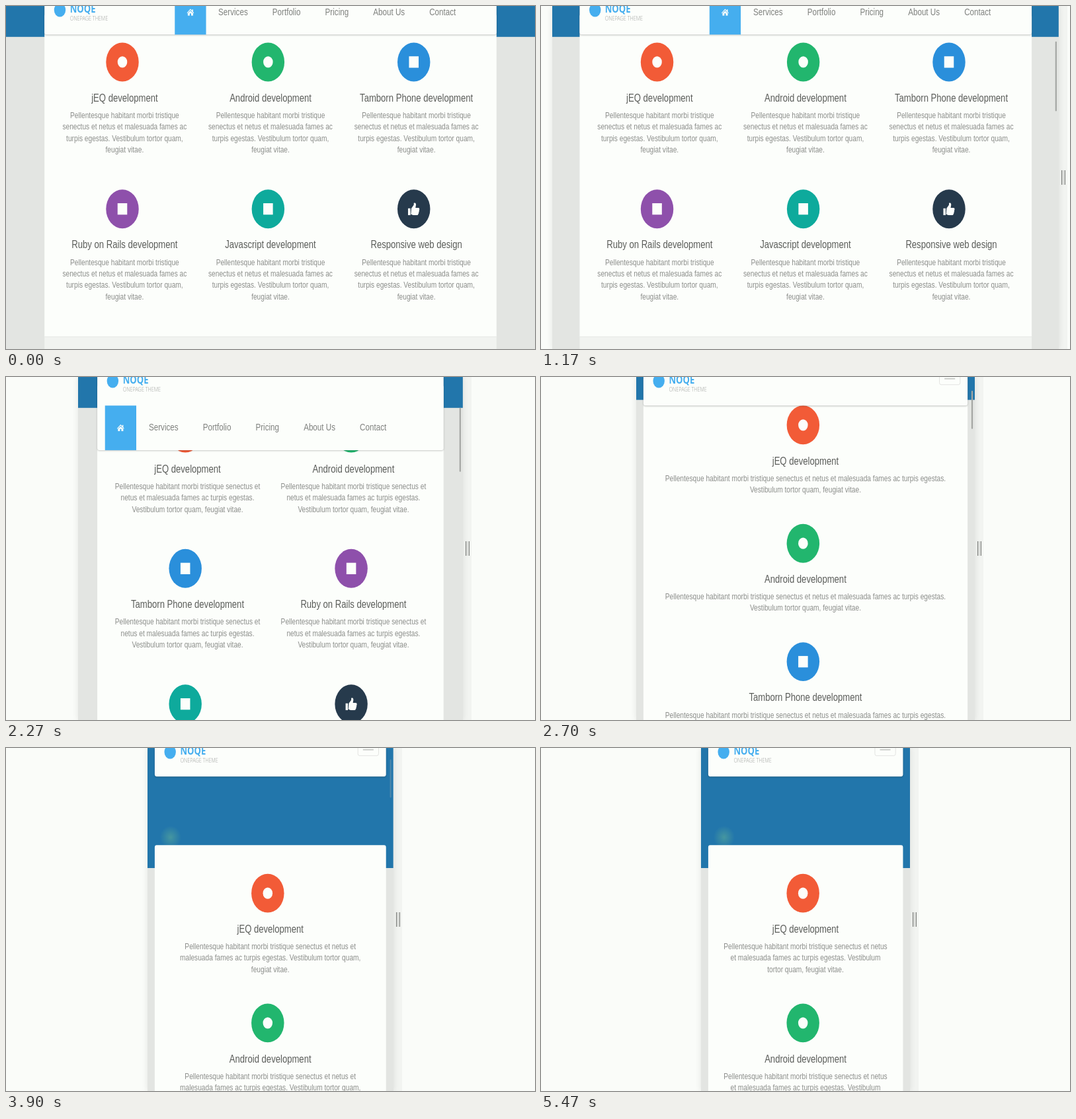
An HTML page that plays this animation: 800x520 px, repeating every 5.53 s.

```html
<!DOCTYPE html>
<html lang="en">
<head>
<meta charset="utf-8">
<title>Responsive page demo</title>
<style>
@property --edge { syntax: "<length>"; inherits: false; initial-value: -16px; }
* { box-sizing: border-box; }
html, body { margin: 0; width: 100%; height: 100%; overflow: hidden; background: #fafcf9; }
.stage { position: relative; width: 800px; height: 520px; overflow: hidden; background: #fafcf9; }

.frame { position: absolute; inset: 0 var(--edge); animation: squeeze 5530ms linear infinite; }
@keyframes squeeze {
  0%, 12.66% { --edge: -16px; }
  21.16% { --edge: 17px; }
  32.55% { --edge: 66.5px; }
  42.86% { --edge: 118px; }
  48.82% { --edge: 144px; }
  52.98% { --edge: 158px; }
  62.03% { --edge: 184.5px; }
  73.6% { --edge: 225px; }
  79.02% { --edge: 235px; }
  83.18%, 100% { --edge: 242px; }
}
.clip { position: absolute; inset: 0; overflow: hidden; background: #e3e5e2; box-shadow: 0 0 9px rgba(0, 0, 0, .1); }
.grip { position: absolute; left: 100%; top: 0; width: 13px; height: 100%; background: #f2f4f1; }
.grip::after { content: ""; position: absolute; left: 4px; top: 249px; width: 4px; height: 22px; border: solid #7b7d7a; border-width: 0 1px; background: #dcdedb; }

/* The page is laid out at 1100 x 600 and shown at 800 x 520. */
.page {
  container-type: inline-size;
  position: absolute; left: 0; top: 0; width: 137.5%; height: 600px;
  transform: scale(calc(8 / 11), calc(13 / 15)); transform-origin: 0 0;
  font: 14px/20px "Liberation Sans", Arial, sans-serif; color: #8b8d8a;
}
.view { --top: 14px; --wide: 940px; --cols: 3; --gap: 59.2px; position: absolute; inset: 0; }
.hero { position: absolute; left: 0; right: 0; top: 0; height: calc(var(--top) + 40px); background: #2276ab; }
.glow { display: none; position: absolute; left: 26px; bottom: 34px; width: 44px; height: 40px; background: radial-gradient(closest-side, #4596a0, #2276ab00); }
.card, .nav { position: absolute; left: 0; right: 0; margin: 0 auto; width: var(--wide); background: #fcfefb; }
.card { top: var(--top); padding: 50px 15px 0; border-radius: 4px 4px 0 0; display: flex; flex-wrap: wrap; }
.card::after { content: ""; position: absolute; left: 0; right: 0; top: 100%; height: 600px; background: #f1f3f0; border-top: 1px solid #e6e8e5; }
.item { width: calc(100% / var(--cols)); padding: 0 15px; margin-bottom: var(--gap); text-align: center; }
.disc { position: relative; left: -5px; display: flex; align-items: center; justify-content: center; width: 68px; height: 68px; margin: 0 auto; border-radius: 50%; }
.dot, .box { width: 20px; height: 20px; background: #fcfefb; }
.dot { border-radius: 50%; }
h4 { margin: 20px 0 9.5px; font-size: 18px; font-weight: 400; line-height: 19.8px; color: #5b5d5a; white-space: nowrap; }
p { margin: 0 0 .5px; }
svg { display: block; fill: #fcfefb; }

.nav { top: 0; height: 50px; border-radius: 0 0 4px 4px; box-shadow: 0 1px 3px rgba(0, 0, 0, .25); }
.mark { position: absolute; left: 20px; top: -5px; width: 24px; height: 24px; border-radius: 50%; background: #45aeef; }
.nav b, .nav small { position: absolute; left: 53px; font-family: "Open Sans", sans-serif; line-height: 1; white-space: nowrap; }
.nav b { top: -4px; font-size: 18px; color: #45aeef; }
.nav small { top: 15.5px; font-size: 10px; font-weight: 300; color: #9a9c99; }
ul { position: absolute; left: 270.5px; top: -28px; display: flex; gap: 1px; margin: 0; padding: 0; list-style: none; white-space: nowrap; }
li { height: 78px; padding: 0 25px; font-size: 16px; line-height: 78px; color: #7f817e; }
.home { width: 65px; padding-top: 33px; background: #45aeef; }
.menu { display: none; position: absolute; right: 15px; top: -20px; width: 44px; height: 34px; padding: 9px 10px; border: 1px solid #dcdedb; border-radius: 4px; }
.menu i { display: block; height: 2px; margin-bottom: 4px; background: #c6c8c5; }
.bar { position: absolute; right: 4px; top: 62px; width: 3px; height: 122px; border-radius: 2px; background: #a4a6a3; }

@container (max-width: 991.9px) {
  .view { --wide: 720px; --cols: 2; }
  .nav { height: 128px; }
  ul { left: 16px; top: 50px; }
  .bar { top: 54px; height: 112px; }
}
@container (max-width: 767.9px) {
  .view { --top: 0px; --wide: calc(100% - 30px); --cols: 1; --gap: 49.2px; }
  .nav { height: 50px; }
  ul { display: none; }
  .menu { display: block; }
  .bar { top: 24px; height: 67px; }
}
@container (max-width: 640px) {
  .view { --top: 74px; }
  .bar { top: 20px; background: rgba(150, 165, 175, .35); }
}
@container (max-width: 520px) {
  .view { --top: 170px; }
  .glow { display: block; }
}
@container (max-width: 445px) {
  .bar { display: none; }
}
</style>
</head>
<body>
<div class="stage">
  <div class="frame">
    <div class="grip"></div>
    <div class="clip">
      <div class="page">
        <div class="view">
          <div class="hero"><div class="glow"></div></div>
          <div class="card"></div>
          <div class="nav">
            <div class="mark"></div><b>NOQE</b><small>ONEPAGE THEME</small>
            <ul>
              <li class="home"><svg width="15" height="12" viewBox="0 0 15 12"><path d="M7.5 0 11 3V1h2v4l2 2-1 1-6.5-6L1 8 0 7zM7.5 3.5 13 8v4H9V8H6v4H2V8z"/></svg></li>
              <li>Services</li><li>Portfolio</li><li>Pricing</li><li>About Us</li><li>Contact</li>
            </ul>
            <div class="menu"><i></i><i></i><i></i></div>
          </div>
          <div class="bar"></div>
        </div>
      </div>
    </div>
  </div>
</div>
<script>
const dot = '<div class="dot"></div>', box = '<div class="box"></div>';
const thumb = `<svg width="24" height="22" viewBox="0 0 24 22"><path d="M0 10h5v12H0zM7 10l5-6V1q0-1 1.5-1 3 0 3 4l-1 5h6q2.5 0 2.5 2.5 0 1.5-1 2 .8 2-.7 3.2 .5 2-1 3 0 2.3-3 2.3h-6q-3 0-6.3-2z"/></svg>`;
const blurb = "Pellentesque habitant morbi tristique senectus et netus et malesuada fames ac turpis egestas. Vestibulum tortor quam, feugiat vitae.";
const items = [
  ["jEQ development", "#f25b37", dot],
  ["Android development", "#22b66e", dot],
  ["Tamborn Phone development", "#2a8fdb", box],
  ["Ruby on Rails development", "#8e50ab", box],
  ["Javascript development", "#0eaa9c", box],
  ["Responsive web design", "#263a4c", thumb]
];
document.querySelector(".card").innerHTML = items.map(([title, color, icon]) =>
  `<div class="item"><div class="disc" style="background:${color}">${icon}</div><h4>${title}</h4><p>${blurb}</p></div>`
).join("");
</script>
</body>
</html>
```
